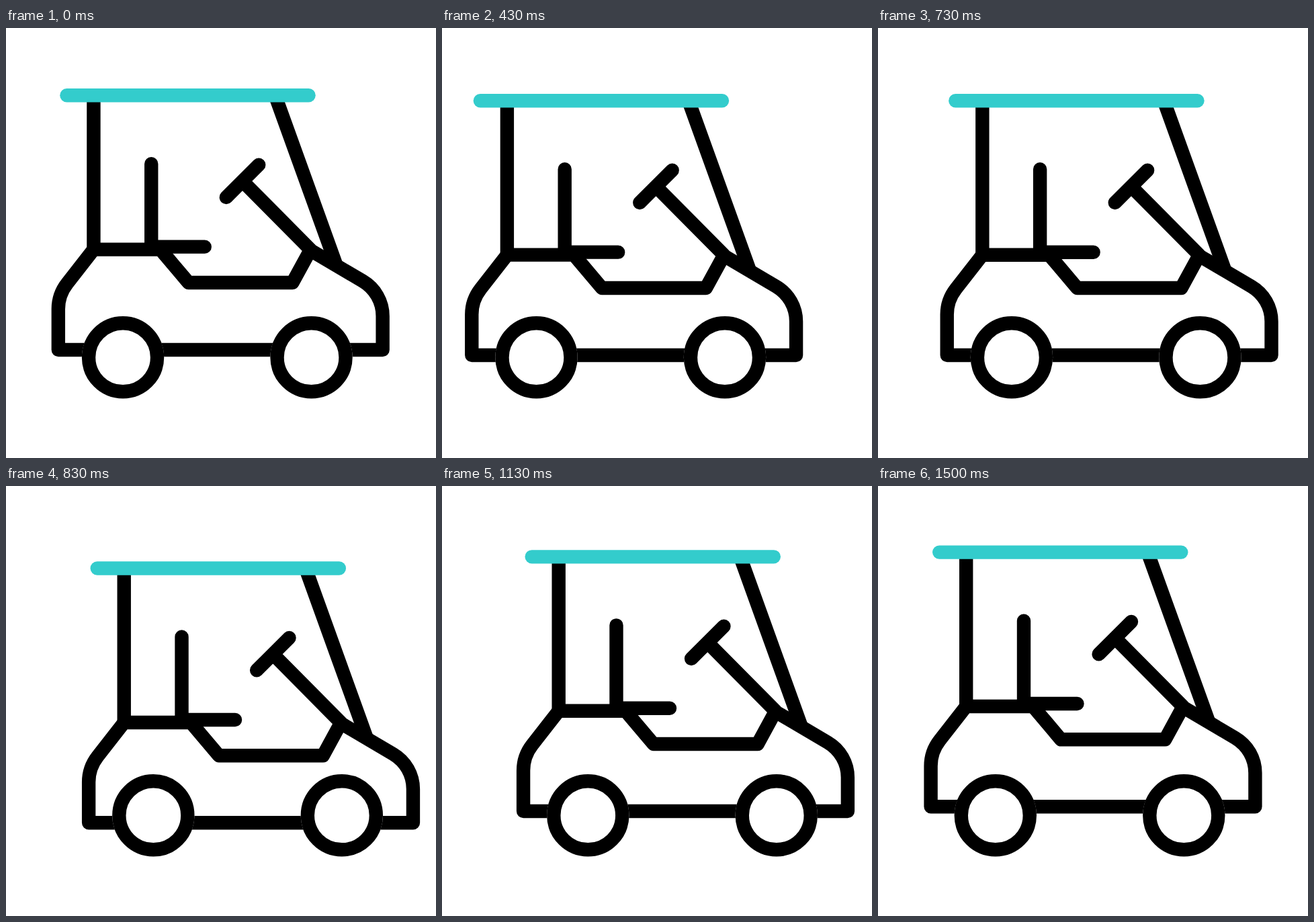
Recreate the animation shown at these times as an HTML page. Size 640 by 640 pixels, loop 1670 ms.

```html
<!DOCTYPE html>
<html lang="en">
<head>
<meta charset="utf-8">
<title>Golf cart</title>
<style>
  html, body { margin: 0; width: 100%; height: 100%; overflow: hidden; background: #fff; }
  svg { display: block; width: 100%; height: 100%; }
  svg * { stroke-width: 20.4; stroke-linejoin: round; }
  #body { fill: none; stroke: #000; stroke-linecap: round; }
  .post { stroke-linecap: butt; }
  .roof { stroke: #33cccc; }
  #wheels { fill: #fff; stroke: #000; }
  #wheels .gap { stroke: none; }
</style>
</head>
<body>
<svg viewBox="0 0 640 640">
  <g id="body">
    <path class="post" d="M130.2 100.6V330M400.3 100.6L491.3 353"/>
    <path d="M130.2 330H229.6L271.3 379.3H426.3L452.7 331L530.7 377A60.4 60.4 0 0 1 560.4 429V479.3H77.6V419A62 62 0 0 1 90.8 380.5Z"/>
    <path d="M216 202.6V326H295.5"/>
    <path d="M327.6 252.3L376 204M351.8 228.2L452.7 330"/>
    <path class="roof" d="M90.2 100.6H450.3"/>
  </g>
  <g id="wheels">
    <circle class="gap" cx="173.8" cy="490.3" r="61.2"/>
    <circle cx="173.8" cy="490.3" r="51"/>
    <circle class="gap" cx="454.3" cy="490.3" r="61.2"/>
    <circle cx="454.3" cy="490.3" r="51"/>
  </g>
</svg>
<script>
  const LOOP = 1670, STEP = 100 / 3;
  const body = document.getElementById('body');
  const wheels = document.getElementById('wheels');

  // [step, offset] keys, eased in and out between neighbours
  const drive = [[-1.1, 1], [11.62, -35], [28.85, 57.3], [44.8, 1]];
  const bounce = [[-1.25, -2], [7.5, 27.5], [17.5, -7], [27.4, 27], [37, -2]];

  function valueAt(keys, n) {
    const i = keys.findIndex(key => key[0] > n);
    if (i < 0) return keys[keys.length - 1][1];
    const [t0, v0] = keys[i - 1], [t1, v1] = keys[i];
    const s = (n - t0) / (t1 - t0);
    return v0 + (v1 - v0) * s * s * (3 - 2 * s);
  }

  function draw(ms) {
    // 30 steps per second, switched on a 10 ms clock
    const t = Math.floor((ms % LOOP) / 10) * 10;
    const n = Math.floor((t + 5) / STEP);
    const x = valueAt(drive, n), y = valueAt(bounce, n);
    body.setAttribute('transform', `translate(${x} ${y})`);
    wheels.setAttribute('transform', `translate(${x} 0)`);
  }

  let start;
  function tick(now) {
    start ??= now;
    draw(Math.max(0, now - start));
    requestAnimationFrame(tick);
  }
  draw(0);
  requestAnimationFrame(tick);
</script>
</body>
</html>
```
